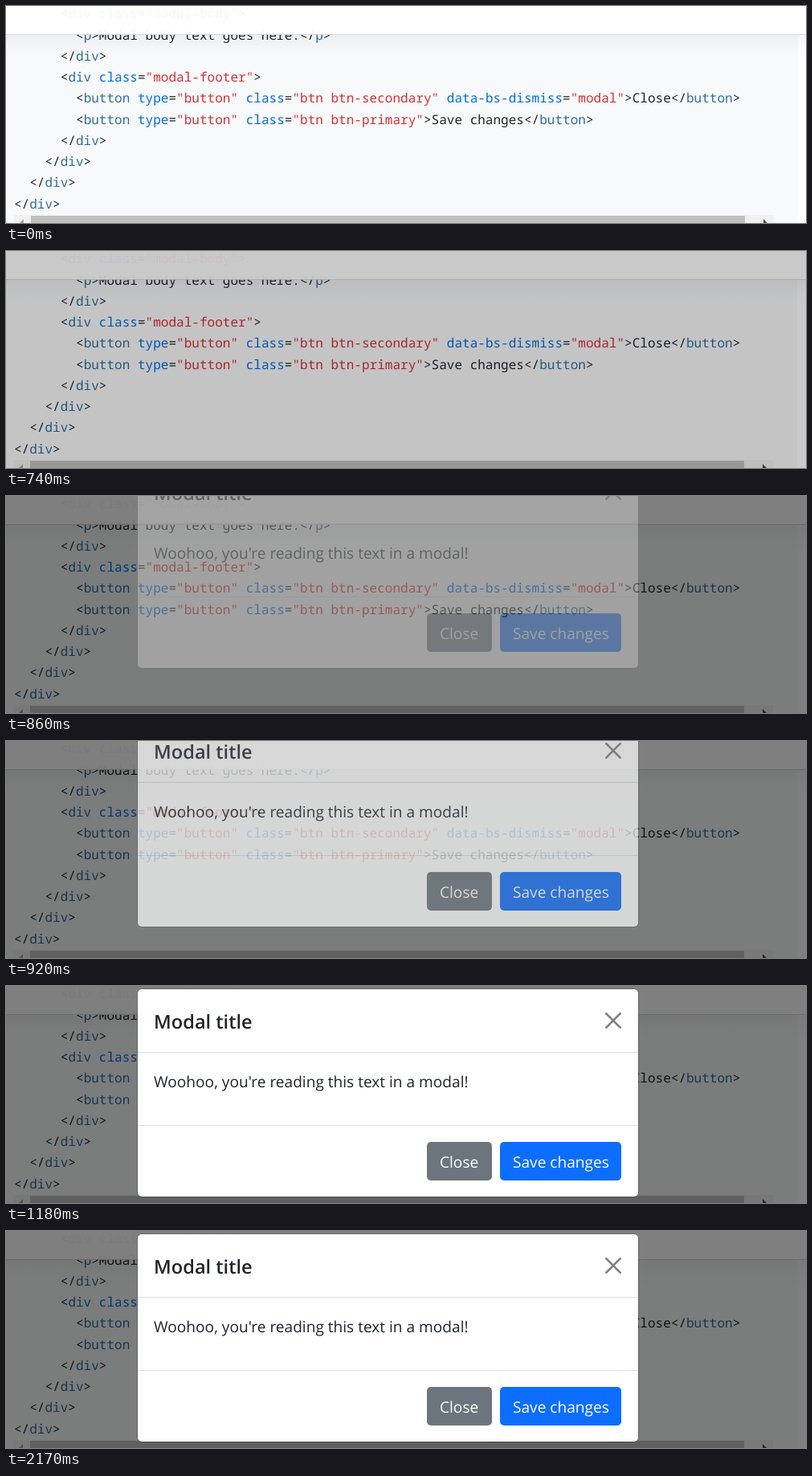
These frames come from a looping animation (996x270 px, 2530 ms). An HTML page:

```html
<!DOCTYPE html>
<html lang="en">
<head>
<meta charset="utf-8">
<title>Modal dialog</title>
<style>
  html, body { margin: 0; width: 100%; height: 100%; overflow: hidden; background: #fff; }
  svg { display: block; }
  text { white-space: pre; text-rendering: geometricPrecision; fill: #212529; }
  .code text { font: 16.04px "Noto Sans Mono", monospace; }
  .tag { fill: #2f6f9f; }
  .attr { fill: #006ee0; }
  .str { fill: #d73038; }
  .modal text { font: 19.1px "Open Sans", sans-serif; }
  .modal .title { font-size: 23.6px; font-weight: 600; }
  .modal .label { fill: #fff; }
</style>
</head>
<body>
<svg width="996" height="270" viewBox="0 0 996 270">
  <defs>
    <linearGradient id="shade" x1="0" y1="0" x2="0" y2="1">
      <stop offset="0" stop-opacity=".042"/>
      <stop offset=".33" stop-opacity=".025"/>
      <stop offset=".67" stop-opacity=".008"/>
      <stop offset="1" stop-opacity="0"/>
    </linearGradient>
  </defs>

  <rect width="996" height="270" fill="#fff"/>
  <rect id="panel" width="986" height="270" fill="#f8f9fa"/>
  <g id="code" class="code"></g>
  <g id="bar">
    <rect x="10" y="260" width="946" height="10" fill="#f1f1f1"/>
    <rect x="31" y="261" width="889" height="9" fill="#c1c1c1"/>
    <path d="M17 270l5-5v5z" fill="#a3a3a3"/>
    <path d="M943 265l5 5h-5z" fill="#505050"/>
  </g>

  <rect width="996" height="36" fill="#fff" opacity=".95"/>
  <rect y="35" width="996" height="1" opacity=".15"/>
  <rect y="36" width="996" height="30" fill="url(#shade)"/>

  <rect id="backdrop" width="996" height="270"/>

  <g id="modal" class="modal">
    <rect x="163.5" y="3.5" width="624" height="259" rx="6" fill="none" stroke="#000" stroke-opacity=".2"/>
    <rect x="164" y="4" width="623" height="258" rx="5" fill="#fff"/>
    <path d="M164 82.5h623M164 173.5h623" stroke="#dee2e6"/>
    <text class="title" x="184" y="52.5">Modal title</text>
    <path d="M747.25 34.25l17.5 17.5m0-17.5l-17.5 17.5" stroke="#808080" stroke-width="2.5" stroke-linecap="round"/>
    <text x="184" y="126">Woohoo, you're reading this text in a modal!</text>
    <rect x="524" y="194" width="81" height="48" rx="5" fill="#6c757d"/>
    <text class="label" x="540" y="226">Close</text>
    <rect x="615" y="194" width="151" height="48" rx="5" fill="#0d6efd"/>
    <text class="label" x="631" y="226">Save changes</text>
  </g>

  <path id="cursor" d="M.5.5v16l3.7-3.5 2.5 5.7 2.4-1-2.5-5.6h5z" fill="#fff" stroke="#000"/>
</svg>

<script>
const LOOP = 2530;
const STEPS = [0, 660, 740, 800, 860, 920, 1000, 1060, 1120, 1180, 2050, 2110, 2170];
const DIM_START = 677, MODAL_START = 817, FADE = 150, SLIDE = 300, DROP = 62.5;
const CHAR = 9.625, LINE = 26.25;

const lines = [
  [6, '<div class="modal-body">'],
  [8, '<p>Modal body text goes here.</p>'],
  [6, '</div>'],
  [6, '<div class="modal-footer">'],
  [8, '<button type="button" class="btn btn-secondary" data-bs-dismiss="modal">Close</button>'],
  [8, '<button type="button" class="btn btn-primary">Save changes</button>'],
  [6, '</div>'],
  [4, '</div>'],
  [2, '</div>'],
  [0, '</div>']
];

const $ = id => document.getElementById(id);
const clamp = v => Math.max(0, Math.min(1, v));

function add(parent, name, attrs, content = '') {
  const el = document.createElementNS('http://www.w3.org/2000/svg', name);
  for (const key in attrs) el.setAttribute(key, attrs[key]);
  el.textContent = content;
  return parent.appendChild(el);
}

// Odd parts of the split are the coloured tokens.
lines.forEach(([indent, source], row) => {
  const text = add($('code'), 'text', { x: 10 + indent * CHAR, y: 15.25 + row * LINE });
  const parts = source.split(/("[^"]*"|[\w-]+(?==")|(?<=<\/?)\w+)/);
  parts.forEach((part, i) => {
    let kind = 'plain';
    if (i % 2) kind = part[0] === '"' ? 'str' : /[<\/]$/.test(parts[i - 1]) ? 'tag' : 'attr';
    if (part) add(text, 'tspan', { class: kind }, part);
  });
});

// cubic-bezier(0, 0, .58, 1)
function easeOut(x) {
  let lo = 0, hi = 1;
  for (let i = 0; i < 24; i++) {
    const s = (lo + hi) / 2;
    if (1.74 * (1 - s) * s * s + s ** 3 < x) lo = s; else hi = s;
  }
  return lo * lo * (3 - 2 * lo);
}

function draw(time) {
  const t = STEPS.findLast(step => step <= time);
  const shift = t >= 660 ? -1 : 0;
  $('panel').setAttribute('width', 986 + shift);
  $('bar').setAttribute('transform', `translate(${shift} 0)`);
  $('backdrop').setAttribute('opacity', 0.5 * clamp((t - DIM_START) / FADE));

  const slide = easeOut(clamp((t - MODAL_START) / SLIDE));
  const rise = Math.round(DROP * (1 - slide));
  $('modal').setAttribute('opacity', clamp((t - MODAL_START) / FADE));
  $('modal').setAttribute('transform', `translate(0 ${-rise})`);

  const visible = t >= 2050 && t < 2170;
  $('cursor').setAttribute('visibility', visible ? 'visible' : 'hidden');
  $('cursor').setAttribute('transform', t < 2110 ? 'translate(819 250)' : 'translate(938 224)');
}

const start = performance.now();
function tick() {
  draw((performance.now() - start) % LOOP);
  requestAnimationFrame(tick);
}
tick();
</script>
</body>
</html>
```
